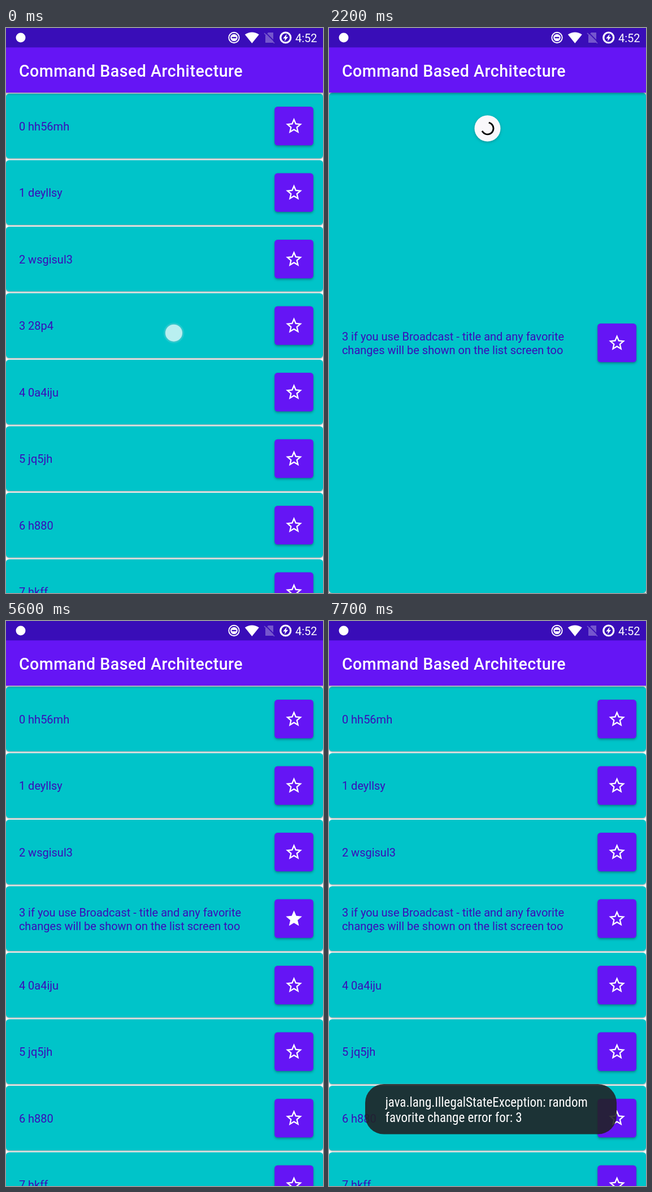
Write an HTML page with a canvas that moves like this. It is 561 px wide and 998 px high and loops after 8000 ms.

```html
<!DOCTYPE html>
<html lang="en">
<head>
<meta charset="utf-8">
<title>Command Based Architecture</title>
<style>
html, body { margin: 0; width: 100%; height: 100%; overflow: hidden; background: #fefefe; }
canvas { display: block; width: 561px; height: 998px; }
</style>
</head>
<body>
<canvas id="stage" width="561" height="998"></canvas>
<script>
const W = 561, H = 998, LOOP = 8000, DP = 10 / 7;
const ctx = document.getElementById('stage').getContext('2d');

const TEAL = '#00c4c9', PURPLE = '#6515f5', DARK = '#390db8', INK = '#3a0cb9', PAGE = '#fefefe';
const ROWS = ['0 hh56mh', '1 deyllsy', '2 wsgisul3', '3 28p4', '4 0a4iju', '5 jq5jh', '6 h880', '7 hkff'];
const LONG = ['3 if you use Broadcast - title and any favorite', 'changes will be shown on the list screen too'];
const ERROR = ['java.lang.IllegalStateException: random', 'favorite change error for: 3'];

// Times of the events in ms
const OPEN = 145, LOADED = 2170, STAR_ON = 4740, BACK = 5470, STAR_OFF = 7260, TOAST = 7165;

const STAR = 'M22 9.24l-7.19-.62L12 2 9.19 8.63 2 9.24l5.46 4.73L5.82 21 12 17.27 18.18 21l-1.63-7.03z';
const starFull = new Path2D(STAR);
const starLine = new Path2D(STAR + 'M12 15.4l-3.76 2.27 1-4.28-3.32-2.88 4.38-.38L12 6.1l1.71 4.04 4.38.38-3.32 2.88 1 4.28z');

const clamp = x => Math.min(1, Math.max(0, x));
const phase = (t, start, length) => clamp((t - start) / length);
const smooth = x => (1 - Math.cos(Math.PI * x)) / 2;

// cubic-bezier(.4, 0, .2, 1)
function fastOutSlowIn(x) {
  let lo = 0, hi = 1;
  for (let i = 0; i < 20; i++) {
    const m = (lo + hi) / 2, n = 1 - m;
    if (1.2 * n * n * m + 0.6 * n * m * m + m * m * m < x) lo = m; else hi = m;
  }
  return lo * lo * (3 - 2 * lo);
}

function shadow(color, blur, dy) {
  ctx.shadowColor = color;
  ctx.shadowBlur = blur;
  ctx.shadowOffsetY = dy;
}

function box(x, y, w, h, r, fill) {
  ctx.fillStyle = fill;
  ctx.beginPath();
  ctx.roundRect(x, y, w, h, r);
  ctx.fill();
}

function disc(x, y, r, fill) {
  ctx.fillStyle = fill;
  ctx.beginPath();
  ctx.arc(x, y, r, 0, Math.PI * 2);
  ctx.fill();
}

function ring(x, y, r, width, color) {
  ctx.strokeStyle = color;
  ctx.lineWidth = width;
  ctx.beginPath();
  ctx.arc(x, y, r, 0, Math.PI * 2);
  ctx.stroke();
}

function shape(points, fill) {
  ctx.fillStyle = fill;
  ctx.beginPath();
  points.forEach(([x, y]) => ctx.lineTo(x, y));
  ctx.fill();
}

function label(text, x, y, font, color, spacing = 0) {
  ctx.font = font;
  ctx.letterSpacing = spacing + 'px';
  ctx.fillStyle = color;
  ctx.fillText(text, x, y);
}

function card(y, h, lines, starred) {
  const mid = y + h / 2;
  ctx.save();
  shadow('rgba(0,0,0,.4)', 2.5, 1);
  box(0, y, W, h, 5.7, TEAL);
  shadow('rgba(0,0,0,.35)', 4, 2);
  box(475.3, mid - 34.2, 68.6, 68.4, 5.2, PURPLE);
  ctx.restore();

  const base = lines.length > 1 ? mid - 4 : mid + 7.7;
  lines.forEach((s, i) => label(s, 22.9, base + i * 24, '20px Roboto, sans-serif', INK));

  ctx.save();
  ctx.translate(509.6 - 12 * DP, mid - 12 * DP);
  ctx.scale(DP, DP);
  ctx.fillStyle = '#fff';
  ctx.fill(starred ? starFull : starLine, 'evenodd');
  ctx.restore();
}

function list(changed, starred) {
  ROWS.forEach((s, i) => {
    const edited = changed && i === 3;
    card(115.9 + i * 117.5, 114.4, edited ? LONG : [s], edited && starred);
  });
}

function statusBar() {
  ctx.fillStyle = DARK;
  ctx.fillRect(0, 0, W, 34.3);
  disc(26, 17, 8.5, '#fff');

  ring(403.5, 17, 9.2, 1.9, '#fff');
  disc(403.5, 17, 6.3, '#fff');
  ctx.fillStyle = DARK;
  ctx.fillRect(399.6, 15.8, 7.8, 2.4);

  ctx.fillStyle = '#fff';
  ctx.beginPath();
  ctx.moveTo(435.3, 27);
  ctx.lineTo(422.8, 11.6);
  ctx.quadraticCurveTo(435.3, 3.6, 447.8, 11.6);
  ctx.fill();

  const dim = '#7556cd';
  shape([[464, 8], [473, 8], [473, 26], [459, 26], [459, 13]], dim);
  ctx.lineCap = 'butt';
  for (const [shift, color] of [[1.6, DARK], [0, dim]]) {
    ctx.strokeStyle = color;
    ctx.lineWidth = 1.7;
    ctx.beginPath();
    ctx.moveTo(457 + shift, 9 - shift);
    ctx.lineTo(475 + shift, 27 - shift);
    ctx.stroke();
  }

  ring(494.8, 17, 9, 3.2, '#fff');
  shape([[496.8, 10.5], [490.3, 18.4], [494, 18.4], [492.9, 23.6], [499.3, 15.7], [495.6, 15.7]], '#fff');
  label('4:52', 512, 25, '20px Roboto, sans-serif', '#fff');
}

function appBar() {
  const g = ctx.createLinearGradient(0, 114, 0, 120);
  g.addColorStop(0, 'rgba(0,0,0,.34)');
  g.addColorStop(0.45, 'rgba(0,0,0,.12)');
  g.addColorStop(1, 'rgba(0,0,0,0)');
  ctx.fillStyle = g;
  ctx.fillRect(0, 114, W, 6);
  ctx.fillStyle = PURPLE;
  ctx.fillRect(0, 34, W, 80.2);
  label('Command Based Architecture', 22.9, 86, '500 28.57px Roboto, sans-serif', '#fff', 0.5);
}

function spinner(t) {
  const size = smooth(phase(t, 95, 420)) * (1 - phase(t, LOADED, 160));
  if (size <= 0) return;
  ctx.save();
  ctx.translate(280.5, 177.4);
  ctx.scale(size, size);
  ctx.save();
  shadow('rgba(0,0,0,.24)', 5, 1.6);
  disc(0, 0, 28.6, '#f9f8fb');
  ctx.restore();

  const run = (t - 548) / 1332;
  if (run > 0) {
    const n = Math.floor(run), f = run - n;
    let tail = 0.8 * n, head = tail + 0.8;
    if (f < 0.5) head = tail + 0.01 + 0.79 * fastOutSlowIn(f * 2);
    else tail = head - 0.01 - 0.79 * (1 - fastOutSlowIn(f * 2 - 1));
    const turn = 0.81 * run;
    ctx.strokeStyle = '#000';
    ctx.lineWidth = 3.5;
    ctx.lineCap = 'square';
    ctx.beginPath();
    ctx.arc(0, 0, 13, (tail + turn) * Math.PI * 2, (head + turn) * Math.PI * 2);
    ctx.stroke();
  }
  ctx.restore();
}

function touch(x, y, alpha) {
  if (alpha <= 0) return;
  ctx.save();
  ctx.globalAlpha = alpha;
  const g = ctx.createRadialGradient(x, y, 14, x, y, 19);
  g.addColorStop(0, 'rgba(255,255,255,.32)');
  g.addColorStop(1, 'rgba(255,255,255,0)');
  disc(x, y, 19, g);
  disc(x, y, 15, 'rgba(255,255,255,.6)');
  ring(x, y, 15.8, 1.6, 'rgba(90,90,100,.09)');
  ctx.restore();
}

function toast(t) {
  const left = 1 - phase(t, TOAST, 500);
  if (left >= 1) return;
  ctx.save();
  ctx.globalAlpha = 1 - left * left;
  box(64, 818, 445, 88.6, 33, 'rgba(32,34,36,.89)');
  ctx.fontStretch = 'condensed';
  ctx.letterSpacing = '0px';
  let font = '23px "Roboto Condensed", Roboto, sans-serif', spacing = 0;
  ctx.font = font;
  // Tighter setting where no condensed face is present
  if (ctx.measureText(ERROR[0]).width > 375) {
    font = '22px Roboto, sans-serif';
    spacing = -0.74;
  }
  ERROR.forEach((s, i) => label(s, 99.7, 858 + i * 27, font, '#fff', spacing));
  ctx.restore();
}

function draw(t) {
  ctx.fillStyle = PAGE;
  ctx.fillRect(0, 0, W, H);

  if (t < OPEN) list(false, false);
  else if (t >= BACK) list(true, t < STAR_OFF);
  else if (t >= LOADED) card(114.3, 883.7, LONG, t >= STAR_ON);

  appBar();
  statusBar();
  if (t >= OPEN && t < BACK) spinner(t);
  touch(297, 538.7, 1 - phase(t, 140, 130));
  if (t >= 4560) touch(535, 549.5, 1.15 * (1 - phase(t, 4720, 160)));
  toast(t);
}

const begin = performance.now();
function frame() {
  draw((performance.now() - begin) % LOOP);
  requestAnimationFrame(frame);
}
frame();
</script>
</body>
</html>
```
